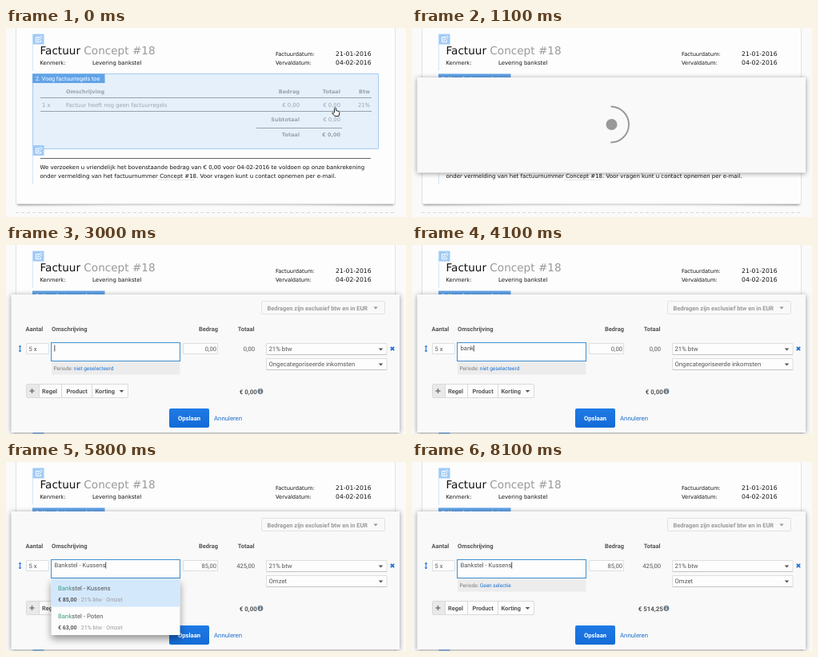
Animation of 500x237 px, one loop 8.2 s. Source, as an HTML page:

```html
<!DOCTYPE html>
<html lang="nl">
<head>
<meta charset="utf-8">
<title>Factuurregels toevoegen</title>
<style>
html, body { margin: 0; width: 100%; height: 100%; overflow: hidden; background: #fafafa; }
svg { display: block; width: 100%; height: 100%; }
text { text-rendering: geometricPrecision; }
.page { font: 6.9px "DejaVu Sans", sans-serif; fill: #111; }
.page .title { font-size: 13.6px; }
.page .date { font-size: 7.65px; }
.page .para { font-size: 6.99px; }
.table { fill: #98a3ae; font-size: 6.8px; }
.table .b { font-size: 6.5px; }
.ui { font: 7.6px Roboto, sans-serif; fill: #555; }
.b { font-weight: bold; }
.end { text-anchor: end; }
.mid { text-anchor: middle; }
.small { font-size: 7.75px; }
.link { fill: #1b6fd0; }
.field { fill: #fdfdfd; stroke: #dedede; }
.line { fill: none; stroke: #98a3ae; }
.shadow { filter: drop-shadow(0 1px 3px rgba(0,0,0,.4)); }
.float { filter: drop-shadow(0 5px 5px rgba(0,0,0,.4)); }
</style>
</head>
<body>
<svg viewBox="0 0 500 237">
  <defs>
    <g id="edit">
      <path d="M0 0h14v13H0z" fill="#a0cbf8"/>
      <path d="M8 4H4v6h6V8M6 8l.4-2L10 2.500l1.500 1.500L8 7.600z" fill="none" stroke="#fff"/>
    </g>
    <g id="spin" fill="none" stroke="#999" stroke-width="2">
      <path d="M-1-22.500A22.500 22.500 0 0 1-1 22.500"/>
    </g>
    <path id="down" d="M-2.800-1.400h5.600L0 1.600z"/>
    <linearGradient id="blue" x2="0" y2="1">
      <stop stop-color="#1f7ae6"/><stop offset="1" stop-color="#136bd6"/>
    </linearGradient>
  </defs>

  <g class="page">
    <g id="below">
      <path d="M16 216H482L485 222Q249 219 14 222z" fill="#888" style="filter:blur(1.500px)"/>
      <path d="M12.500-200V220.500H486.500V-200z" fill="#fdfdfd" stroke="#e2e2e2"/>
      <path d="M12 231.500H487" stroke="#d8d8d8" stroke-dasharray="4 3"/>
      <path d="M33.500 148V195" stroke="#a9cff5" stroke-dasharray="1 1"/>
      <path d="M43 163.500H456" stroke="#666"/>
      <text class="para" x="42.500" y="177">We verzoeken u vriendelijk het bovenstaande bedrag van € 0,00 voor 04-02-2016 te voldoen op onze bankrekening</text>
      <text class="para" x="42.500" y="188">onder vermelding van het factuurnummer Concept #18. Voor vragen kunt u contact opnemen per e-mail.</text>
      <path d="M190 190.500H236" stroke="#ccc" stroke-dasharray="1 1"/>
    </g>
    <path d="M33.500 8V53" stroke="#a9cff5" stroke-dasharray="1 1"/>
    <use href="#edit" x="33.500" y="7.500"/>
    <text class="title" x="42.500" y="33">Factuur <tspan fill="#999">Concept #18</tspan></text>
    <text x="42.500" y="46" font-size="6.7">Kenmerk:</text>
    <text x="108" y="46">Levering bankstel</text>
    <text x="337" y="35" font-size="6.7">Factuurdatum:</text>
    <text x="337" y="46" font-size="6.7">Vervaldatum:</text>
    <text class="date end" x="456.500" y="35">21-01-2016</text>
    <text class="date end" x="456.500" y="46">04-02-2016</text>

    <g id="box" class="table">
      <path d="M33.500 57.500H465.500V151.500H33.500z" fill="#e5f0fb" stroke="#a6caf0"/>
      <text class="b" x="75" y="82">Omschrijving</text>
      <text class="b end" x="367" y="82">Bedrag</text>
      <text class="b end" x="418" y="82">Totaal</text>
      <text class="b end" x="455" y="82">Btw</text>
      <text x="45" y="98.500">1 x</text>
      <text x="75" y="98.500">Factuur heeft nog geen factuurregels</text>
      <text class="end" x="367" y="98.500">€ 0,00</text>
      <text class="end" x="418" y="98.500">€ 0,00</text>
      <text class="end" x="455" y="98.500">21%</text>
      <text class="b end" x="367" y="117">Subtotaal</text>
      <text class="end" x="418" y="117">€ 0,00</text>
      <text class="b end" x="367" y="136">Totaal</text>
      <text class="b end" x="418" y="136">€ 0,00</text>
      <path class="line" d="M43 87.500H457M43 104.500H457M313 125.500H420"/>
    </g>
    <path d="M33 57.500h90.500v11.500H33z" fill="#61a3e8"/>
    <text class="ui" x="37" y="66" style="font-size:7.2px;fill:#fff">2. Voeg factuurregels toe</text>
    <use id="edit2" href="#edit" x="33.500" y="147"/>
  </g>

  <path id="hand" d="M410.500 106V100.500q1-1.500 2 0V103.500l3.500 1q1 .5 .8 2L416 110.500h-5l-3.300-3.800q.5-1.500 2 0z" fill="#fff" stroke="#222"/>

  <g id="modal" class="ui">
    <rect id="panel" class="shadow" x="6.500" y="62" width="485.500" fill="#f9f9f9"/>
    <g id="loader" transform="translate(249.500 121)">
      <circle r="7" fill="#999"/><use id="arc1" href="#spin"/>
    </g>
    <g id="form">
      <rect x="319.500" y="70.500" width="154" height="16" rx="1" fill="#f9f9f9" stroke="#e2e2e2"/>
      <text class="b" x="326.500" y="81.500" style="font-size:7.45px;fill:#999">Bedragen zijn exclusief btw en in EUR</text>
      <use href="#down" x="462" y="79" fill="#999"/>
      <g class="b" style="font-size:7.5px">
        <text x="24.500" y="108">Aantal</text>
        <text x="57" y="108">Omschrijving</text>
        <text class="end" x="265" y="108">Bedrag</text>
        <text class="end" x="310.500" y="108">Totaal</text>
      </g>
      <g id="tools" fill="none" stroke="#1b6fd0">
        <path d="M17.500 126V134M16 127.700l1.500-1.700 1.500 1.700M16 132.300l1.500 1.700 1.500-1.700"/>
        <path d="M480.800 127.800l4.400 4.400m0-4.400l-4.400 4.400" stroke-width="1.700"/>
      </g>
      <path id="count" class="field" d="M25.500 123.500h28v13h-28z"/>
      <path class="field" d="M221.500 123.500h43v13h-43zM325.500 123.500h150.500v14h-150.500zM325.500 142.500h150.500v14h-150.500z"/>
      <path d="M326 137.500h150M326 156.500h150" stroke="#c4c4c4"/>
      <text id="qty" x="28.500" y="133"></text>
      <text id="price" class="end" x="263" y="133"></text>
      <text id="sum" class="end" x="311" y="133"></text>
      <text class="small" x="328.500" y="133">21% btw</text>
      <text id="category" class="small" x="328.500" y="152"></text>
      <use href="#down" x="468.500" y="131"/><use href="#down" x="468.500" y="150"/>
      <g id="period" style="font-size:6.5px">
        <path d="M57 145h160.500v17.500H57z" fill="#ececec"/>
        <text x="59.500" y="157" fill="#777">Periode: <tspan id="range" class="link"></tspan></text>
      </g>
      <rect id="desc" class="field" x="56.500" y="122.500" width="161"/>
      <text id="typed" x="60.500" y="132"></text>
      <path id="caret" d="M0 125.500V133.500" stroke="#222" stroke-width=".8"/>
      <rect x="25.500" y="174.500" width="127" height="17" rx="1.500" fill="#fcfcfc" stroke="#dadada"/>
      <path d="M26 175h15v16H26z" fill="#e9e9e9"/>
      <path d="M41.500 175v16M69.500 175v16M107.500 175v16" stroke="#dadada"/>
      <path d="M29.500 183h6M32.500 180v6" stroke="#777" stroke-width="1.500"/>
      <g class="b" style="font-size:7.4px">
        <text x="45" y="186">Regel</text>
        <text x="75.500" y="186">Product</text>
        <text x="111.500" y="186">Korting</text>
      </g>
      <use href="#down" x="144.500" y="183.500"/>
      <text id="total" class="b end" x="313.800" y="186.500" style="font-size:7.9px"></text>
      <circle cx="317.900" cy="183.500" r="3.400" fill="#667b8c"/>
      <path d="M317.900 181v1.200M317.900 183v2.700" stroke="#fff" stroke-width="1.200"/>
      <rect x="204" y="205" width="50" height="24" rx="2" fill="url(#blue)"/>
      <text class="b mid" x="229" y="219.700" style="font-size:7.7px;fill:#fff">Opslaan</text>
      <text class="link" x="260" y="220" style="font-size:7.8px">Annuleren</text>
    </g>
    <g id="drop">
      <rect id="sheet" class="float" x="56.500" y="146.500" width="161" fill="#fcfcfc"/>
      <g id="wait" transform="translate(137.500 177.500)">
        <circle r="7" fill="#999"/><use id="arc2" href="#spin"/>
      </g>
      <g id="list">
        <path id="pick" d="M56.500 146.500h161v35h-161z" fill="#d4e8fc"/>
      </g>
    </g>
  </g>
</svg>
<script>
const $ = id => document.getElementById(id);
const ramp = (t, a, b) => Math.min(1, Math.max(0, (t - a) / (b - a)));
const ease = x => 1 - (1 - x) ** 3;
const show = (id, o) => $(id).setAttribute('opacity', +o);
const set = (id, name, value) => $(id).setAttribute(name, value);
const write = (id, s) => { if ($(id).textContent !== s) $(id).textContent = s; };
const within = (t, a, b) => t >= a && t < b;

[['Kussens', '85,00'], ['Poten', '63,00']].forEach(([name, price], i) => {
  const y = 161 + 35 * i;
  $('list').insertAdjacentHTML('beforeend',
    `<text x="65" y="${y}" style="font-size:7.8px"><tspan fill="#3a9e88">Bank</tspan>stel - ${name}</text>
     <text x="65" y="${y + 13.5}" style="font-size:7px"><tspan class="b">€ ${price}</tspan><tspan fill="#999"> · 21% btw · Omzet</tspan></text>`);
});

const LOOP = 8200, LOADED = 1500, FOCUS = 2900, TYPE = 3500, OPEN = 4200, FOUND = 5300, CHOSEN = 5800, CLOSED = 5900, TOTAL = 6700;
const ACCENT = '#3f8fd0';
const blinks = [3200, 6600, 7200, 7800];

function draw(t) {
  const open = ease(ramp(t, 100, 300));
  const grow = ease(ramp(t, LOADED, LOADED + 200));
  show('hand', t < 100);
  show('box', 1 - open);
  show('modal', open);
  set('modal', 'transform', `translate(0 ${-8 * (1 - open)})`);
  set('panel', 'height', 119.5 + 53.5 * grow);
  // The taller form pushes the rest of the page down.
  for (const id of ['below', 'edit2']) set(id, 'transform', `translate(0 ${88 * grow})`);
  show('loader', t < LOADED);
  set('arc1', 'transform', `rotate(${(t - 1100) * .36})`);
  show('form', ramp(t, LOADED, LOADED + 200));

  const focus = ease(ramp(t, FOCUS - 100, FOCUS + 100));
  const chosen = t >= CHOSEN;
  show('tools', t >= 2100);
  $('count').style.stroke = within(t, 2300, FOCUS) ? ACCENT : '';
  write('qty', t < 2600 ? '1 x' : '5 x');
  set('desc', 'height', 14 + 9 * focus);
  $('desc').style.stroke = t >= FOCUS ? ACCENT : '';
  show('period', focus);
  write('range', chosen ? 'Geen selectie' : 'niet geselecteerd');
  write('price', chosen ? '85,00' : '0,00');
  write('sum', chosen ? '425,00' : '0,00');
  write('category', chosen ? 'Omzet' : 'Ongecategoriseerde inkomsten');

  const letters = t < TYPE ? 0 : Math.floor((t - TYPE) / 200) + 1;
  write('typed', chosen ? 'Bankstel - Kussens' : 'bank'.slice(0, letters));
  set('caret', 'transform', `translate(${$('typed').getComputedTextLength() + 60.8})`);
  show('caret', t >= FOCUS && !blinks.some(b => within(t, b, b + 300)));

  show('drop', within(t, OPEN, CLOSED));
  set('sheet', 'height', t < FOUND ? 63 : 70.5);
  show('wait', t < FOUND);
  set('arc2', 'transform', `rotate(${158 + (t - 4700) * .36})`);
  show('list', t >= FOUND);
  show('pick', t >= FOUND + 100);

  write('total', t < TOTAL ? '€ 0,00' : '€ 514,25');
  show('total', 1 - .65 * (ramp(t, CLOSED, CLOSED + 100) - ramp(t, TOTAL, TOTAL + 200)));
}

const start = performance.now();
function tick() {
  draw((performance.now() - start) % LOOP);
  requestAnimationFrame(tick);
}
tick();
</script>
</body>
</html>
```
